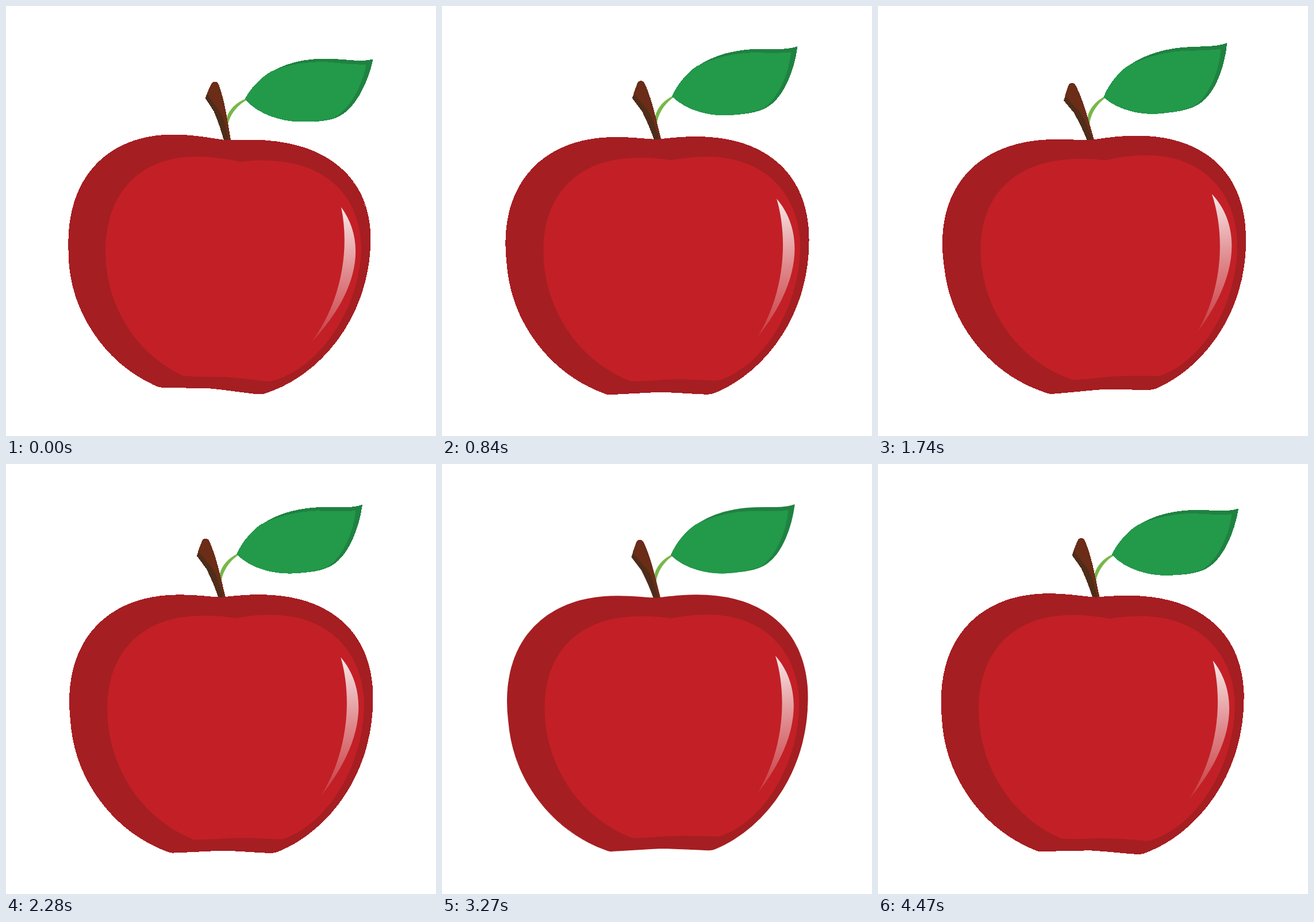
An HTML page for the animation above (4500 ms loop, 748x748 px).

```html
<!DOCTYPE html>
<html lang="en">
<head>
<meta charset="utf-8">
<title>Apple</title>
<style>
  html, body { margin: 0; width: 100%; height: 100%; overflow: hidden; background: #fff; }
  svg { display: block; width: 100%; height: 100%; }
  .edge { stroke-width: 1; stroke-linejoin: round; shape-rendering: crispEdges; }
  .leaf { fill: #23994a; stroke: #23994a; }
  .leaf-rim { fill: #1f8241; stroke: #1f8241; }
  .stem { fill: #6b2c18; stroke: #6b2c18; }
  .stem-rim { fill: #4e2d19; stroke: #4e2d19; }
  .body { fill: #c22026; }
  .body-rim { fill: #a51e22; stroke: #a51e22; }
</style>
</head>
<body>
<svg viewBox="0 0 748 748">
  <defs>
    <linearGradient id="shine" x1="0" y1="0" x2="0" y2="1">
      <stop offset="0" stop-color="#fff" stop-opacity=".9"/>
      <stop offset=".5" stop-color="#fff" stop-opacity=".47"/>
      <stop offset="1" stop-color="#fff" stop-opacity=".12"/>
    </linearGradient>
  </defs>
  <g id="apple">
    <path fill="#78b74a" d="M418 161C401 167 388 180 384 194L386 207C389 190 402 173 418 164Z"/>
    <path class="edge leaf-rim" d="M416 162C440 117 490 93 553 92C590 92 615 99 638 93C630 130 610 175 580 191C562 201 535 201 515 201C480 201 440 189 416 162Z"/>
    <path class="edge leaf" d="M416 162C432 135 448 122 462 114C500 99 535 97 560 98C585 100 605 103 626 102C620 135 600 178 570 194C550 200 530 201 515 201C480 201 440 189 416 162Z"/>
    <path class="edge stem-rim" d="M347 160L357 137Q359 132 363 132Q368 132 370 138C380 165 384 195 391 236L380 236C374 212 367 195 362 183Z"/>
    <path class="edge stem" d="M350 152L357 137Q359 132 363 132Q368 132 370 138C380 165 384 195 391 236L388 236C384 212 378 188 367 176Z"/>
    <path class="edge body-rim" d="M386 234C398 233 410 233 428 233C564 235 634 303 634 408C631 546 543 645 449 674Q445 675 439 675C410 672 380 667 356 665C325 664 300 664 270 663Q266 663 262 661C170 620 109 528 109 425C104 300 176 224 292 224C335 224 360 232 386 234Z"/>
    <path class="body" d="M407 271C425 269 440 268 460 269C560 273 617 335 618 420C617 520 550 628 464 652Q460 653 455 653C430 650 400 646 370 645C345 645 325 645 307 643C225 604 174 520 173 430C172 330 228 262 332 262C360 262 385 266 407 271Z"/>
    <path fill="url(#shine)" d="M583 350C624 405 620 490 532 584C585 512 598 420 583 350Z"/>
  </g>
</svg>
<script>
const LOOP = 4500, STEP = 30;

// turning points as [ms, value]; the apple eases from one to the next
const turn = [[0, 0], [1480, -7], [2020, -5.8], [2730, 0.4], [3600, -7.1], [LOOP, -2.4]];
const wide = [[0, 1], [1000, 1.005], [2700, 1.005], [3270, 0.996], [3720, 1.01], [LOOP, 1.002]];
const tall = [[0, 1], [640, 1.017], [1740, 1.003], [2600, 1.025], [3270, 1.008], [LOOP, 1.018]];

function sway(points, t) {
  const i = points.findIndex(p => p[0] > t);
  const [t0, v0] = points[i - 1], [t1, v1] = points[i];
  const u = (t - t0) / (t1 - t0);
  return v0 + (v1 - v0) * (1 - Math.cos(Math.PI * u)) / 2;
}

const apple = document.getElementById("apple");

function draw(t) {
  apple.setAttribute("transform",
    `rotate(${sway(turn, t)} 378 368) translate(374 320) ` +
    `scale(${sway(wide, t)} ${sway(tall, t)}) translate(-374 -320)`);
}

const start = performance.now();

function tick() {
  const t = Math.max(0, performance.now() - start) % LOOP;
  draw(Math.floor(t / STEP) * STEP);
  requestAnimationFrame(tick);
}

draw(0);
requestAnimationFrame(tick);
</script>
</body>
</html>
```
